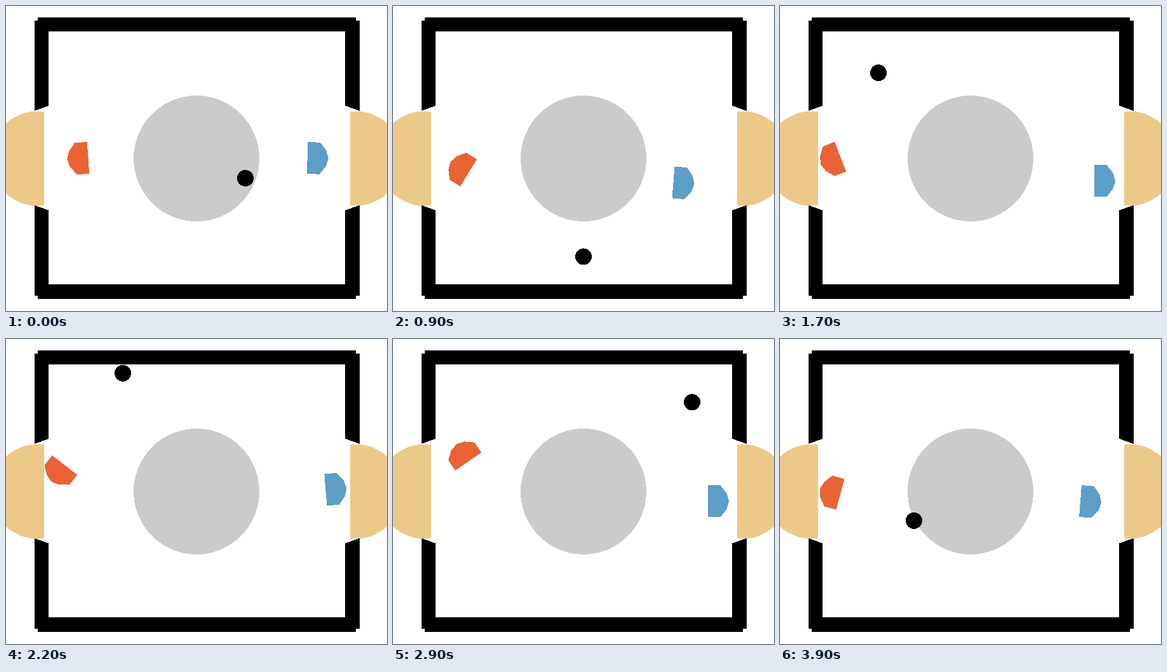
An HTML page that plays this animation: 600x480 px, repeating every 4 s.

```html
<!DOCTYPE html>
<html lang="en">
<head>
<meta charset="utf-8">
<title>Table hockey</title>
<style>
  html, body { margin: 0; width: 100%; height: 100%; overflow: hidden; background: #fff; }
  svg { display: block; width: 600px; height: 480px; shape-rendering: crispEdges; }
  #red, #blue { stroke-width: 2; stroke-linejoin: miter; }
  #red { fill: #eb6235; stroke: #eb6235; }
  #blue { fill: #5d9ec7; stroke: #5d9ec7; }
</style>
</head>
<body>
<svg viewBox="0 0 600 480">
  <defs>
    <path id="racket" d="M-12 24H6V-24H-12L-21.6 -12L-25.2 0L-21.6 12Z"/>
    <path id="post" d="M44.8 23H67V157L44.8 165Z"/>
  </defs>
  <g fill="#edc989">
    <circle cx="50" cy="240" r="74.5"/>
    <circle cx="550" cy="240" r="74.5"/>
  </g>
  <path d="M60 160H542V320H60Z" fill="#fff"/>
  <circle cx="300" cy="240" r="99" fill="#cbcbcb"/>
  <path d="M50 18H551V40H50ZM50 438H551V461H50Z"/>
  <use href="#post"/>
  <use href="#post" transform="matrix(-1 0 0 1 601.4 0)"/>
  <use href="#post" transform="matrix(1 0 0 -1 0 478.5)"/>
  <use href="#post" transform="matrix(-1 0 0 -1 601.4 478.5)"/>
  <g id="red"><use href="#racket"/></g>
  <g id="blue"><use href="#racket" transform="scale(-1 1)"/></g>
  <circle id="puck" r="13"/>
</svg>
<script>
  const LOOP = 4000, STEP = 100;

  // The puck glides and bounces; each hit sets a new velocity in px per step.
  const serve = [377, 271];
  const hits = [
    { at: 0, v: [0.8, -3.8] },
    { at: 500, v: [-20.25, 35.6] },
    { at: 1300, v: [-16, -52] },
    { at: 2000, v: [38.5, -51.5] },
    { at: 2200, v: [41, 112.8] },
    { at: 2900, v: [14, 82.3] },
    { at: 3500, v: [-69, 7.25] }
  ];

  // Racket poses (x, y, angle) at the turning points of play
  const turns = [0, 500, 1300, 2200, 2900, 3500, 3900];
  const poses = {
    red: [[122.5, 239.4, -4], [137, 252.4, 62], [89, 265.3, 1], [88, 204, -52.4],
          [114.7, 187, 56], [88.8, 187, -34.4], [88.2, 242.5, 15]],
    blue: [[481.6, 239.4, 1], [401, 253.3, 4.5], [496, 302.8, 4.5], [510.3, 236.8, -4.5],
           [503, 255.3, 0], [507, 253.3, 0], [480, 255.6, 4.5]]
  };

  // Reflects a coordinate between two walls.
  function bounce(p, lo, hi) {
    const span = hi - lo, d = (((p - lo) % (2 * span)) + 2 * span) % (2 * span);
    return lo + (d > span ? 2 * span - d : d);
  }

  function puckAt(t) {
    let [x, y] = serve;
    hits.forEach(({ at, v }, i) => {
      const end = i + 1 < hits.length ? hits[i + 1].at : LOOP;
      const n = Math.max(0, Math.min(t, end) - at) / STEP;
      x = bounce(x + v[0] * n, 80, 521);
      y = bounce(y + v[1] * n, 53, 425);
    });
    return [x, y];
  }

  function racketAt(path, t) {
    const i = turns.findLastIndex(turn => turn <= t);
    if (i === turns.length - 1) return path[i];
    const u = (t - turns[i]) / (turns[i + 1] - turns[i]);
    const ease = u * u * (3 - 2 * u);
    return path[i].map((v, k) => v + (path[i + 1][k] - v) * ease);
  }

  function place(id, [x, y, angle = 0]) {
    document.getElementById(id).setAttribute("transform", `translate(${x} ${y}) rotate(${angle})`);
  }

  const start = performance.now();
  function tick() {
    const t = Math.floor((performance.now() - start) % LOOP / STEP) * STEP;
    place("puck", puckAt(t));
    for (const id in poses) place(id, racketAt(poses[id], t));
    requestAnimationFrame(tick);
  }
  tick();
</script>
</body>
</html>
```
